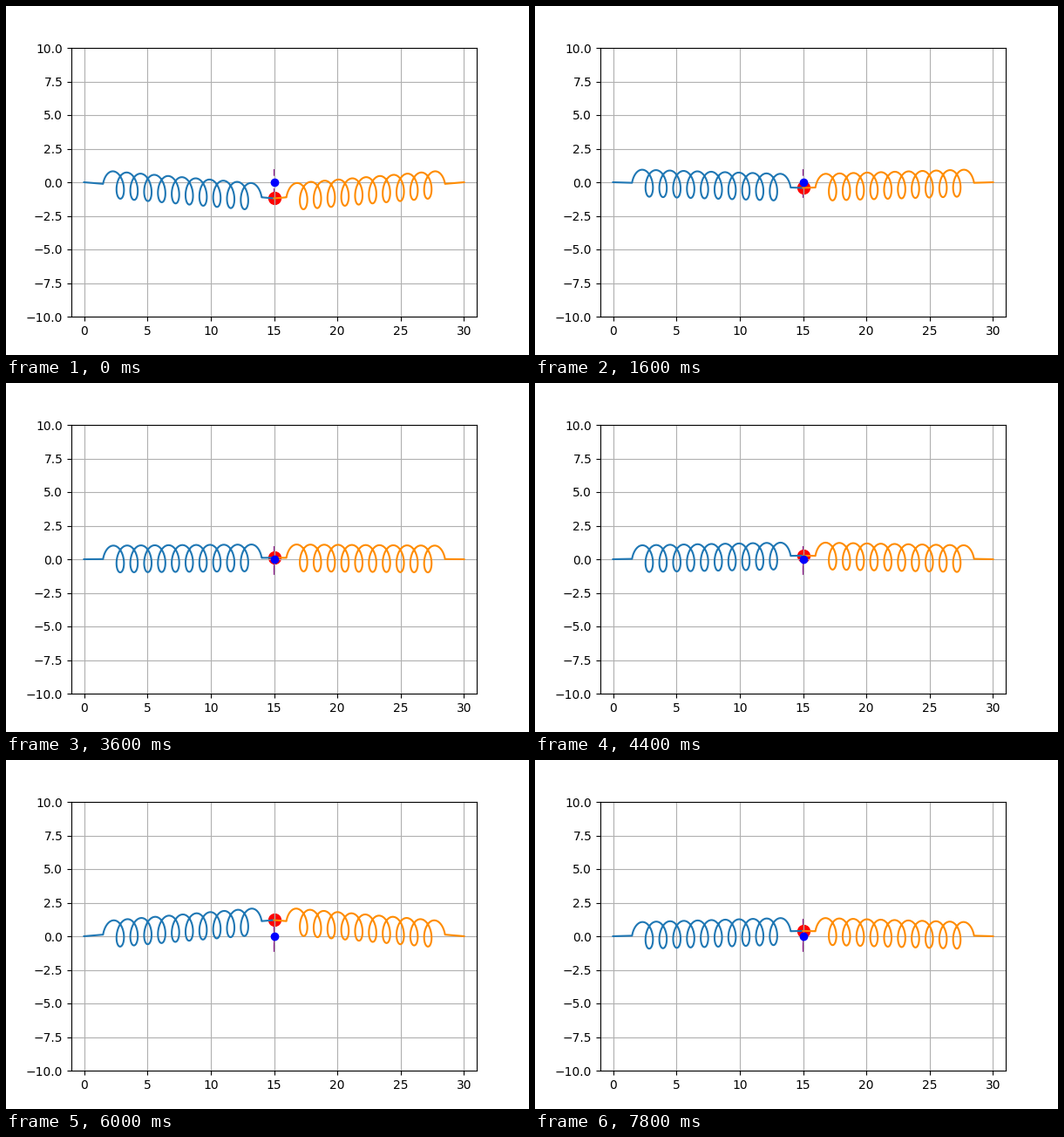
A matplotlib script for the animation above (8000 ms loop, 600x400 px).

```python
import numpy as np
import matplotlib.pyplot as plt
from matplotlib.animation import FuncAnimation

FRAMES, STEP = 40, 200
SPAN = 15.0          # distance from a wall to the bob
COIL_START = 1.5
TURNS = 10.5
PITCH, SWAY = 1.09, 0.54

# Height of the bob at a few moments (seconds)
KEY_T = np.array([0, 0.8, 1.6, 2.6, 3.5, 4.4, 5.2, 6.2, 6.8, 7.8])
KEY_Y = np.array([-1.2, -0.92, -0.42, 0.0, 0.1, 0.27, 0.8, 1.23, 1.08, 0.4])
SLOPE = np.gradient(KEY_Y, KEY_T)
SLOPE[0] = 0


def height(t):
    """Cubic Hermite curve through the key heights."""
    k = np.clip(np.searchsorted(KEY_T, t, side="right") - 1, 0, len(KEY_T) - 2)
    h = KEY_T[k + 1] - KEY_T[k]
    u = (t - KEY_T[k]) / h
    return ((1 + 2 * u) * (1 - u) ** 2 * KEY_Y[k]
            + u * (1 - u) ** 2 * h * SLOPE[k]
            + u * u * (3 - 2 * u) * KEY_Y[k + 1]
            + u * u * (u - 1) * h * SLOPE[k + 1])


def coil_shape():
    """Spring from (0, 0) to (SPAN, 0), straight at both ends."""
    a = np.linspace(0, 2 * np.pi * TURNS, 800)
    x = COIL_START + PITCH * a / (2 * np.pi) + SWAY * (1 - np.cos(a))
    return np.r_[0, x, SPAN], np.r_[0, np.sin(a), 0]


heights = height(np.arange(FRAMES) * STEP / 1000)
coil_x, coil_y = coil_shape()

fig, ax = plt.subplots(figsize=(6, 4), dpi=100)
ax.set_xlim(-1, 31)
ax.set_ylim(-10, 10)
ax.grid(True)

left, = ax.plot([], [], color="C0", lw=1.5)
right, = ax.plot([], [], color="darkorange", lw=1.5)
trail, = ax.plot([], [], "--", color="purple", lw=1.5, zorder=0.9)
bob = ax.scatter([SPAN], [0], s=100, color="red")
ax.plot([SPAN], [0], "o", color="blue", zorder=3)


def draw(i):
    y = heights[i]
    lifted = coil_y + y * coil_x / SPAN
    left.set_data(coil_x, lifted)
    right.set_data(2 * SPAN - coil_x, lifted)
    path = np.r_[1.0, heights[:i + 1]]
    trail.set_data(np.full(len(path), SPAN), path)
    bob.set_offsets([[SPAN, y]])
    return left, right, trail, bob


anim = FuncAnimation(fig, draw, frames=FRAMES, interval=STEP,
                     init_func=lambda: draw(0), repeat=True, repeat_delay=0)
plt.show()
```
